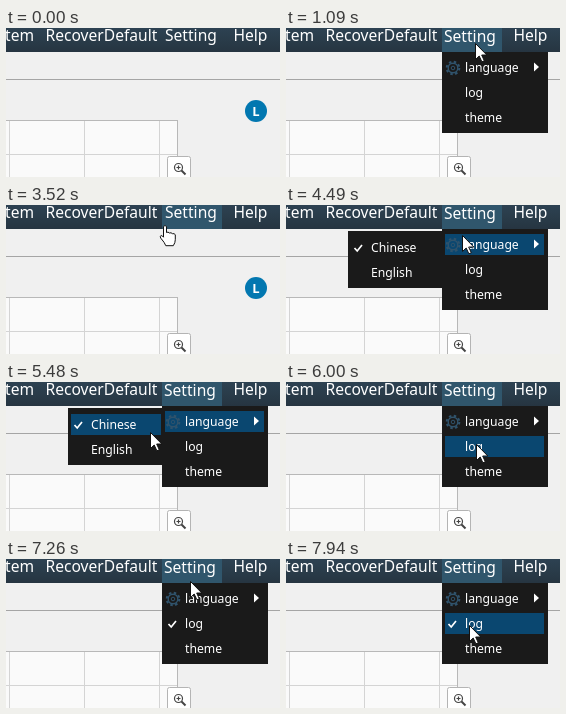
An HTML page for the animation above (8000 ms loop, 274 by 149 pixels).

```html
<!DOCTYPE html>
<html lang="en">
<head>
<meta charset="utf-8">
<title>Settings menu</title>
<style>
html, body { margin: 0; height: 100%; overflow: hidden; background: #f0f0f0; }
svg { display: block; width: 100vw; height: 100vh; }
text { font-family: "Noto Sans", "Open Sans", sans-serif; fill: #fff; }
.bar text { font-size: 15.6px; }
.menu text { font-size: 12.2px; }
.menu > rect:first-child { fill: #1a1a1a; }
.menu > .lit { fill: #0a4770; }
.tick { fill: none; stroke: #fff; stroke-width: 1.7; }
.cursor { fill: #fff; stroke: #111; stroke-width: 1; stroke-linejoin: round; }
</style>
</head>
<body>
<svg viewBox="0 0 274 149">
  <defs>
    <linearGradient id="shade" x2="0" y2="1">
      <stop stop-color="#2d4252"/><stop offset="1" stop-color="#263541"/>
    </linearGradient>
  </defs>
  <rect width="274" height="149" fill="#f0f0f0"/>
  <rect y="51" width="274" height="1" fill="#a5a5a5"/>

  <rect x="-1" y="92.5" width="172.5" height="60" fill="#fafafa" stroke="#b8b8b8"/>
  <path d="M3.5 93v56M78.5 93v56M153.5 93v56M0 126.5h171" stroke="#d4d4d4"/>
  <rect x="161.5" y="128.5" width="23" height="26" rx="2" fill="#fff" stroke="#b4b4b4"/>
  <g fill="none" stroke="#444" stroke-width="1.2">
    <circle cx="172.5" cy="139.5" r="4"/>
    <path d="M170.5 139.5h4M172.5 137.5v4"/>
    <path d="M175.5 142.5l4 4" stroke-width="2"/>
  </g>
  <circle cx="250" cy="83" r="11" fill="#0277b0"/>
  <text x="250" y="88" font-size="13" font-weight="700" text-anchor="middle">L</text>

  <g class="bar">
    <rect width="274" height="24" fill="url(#shade)"/>
    <rect id="button" x="156" width="60" height="24" fill="#30566c"/>
    <text x="-1" y="13">tem</text>
    <text x="39.5" y="13">RecoverDefault</text>
    <text id="setting" x="159" y="13">Setting</text>
    <text x="227.5" y="13">Help</text>
  </g>

  <g class="menu" id="menu">
    <rect x="156" y="24" width="106" height="81"/>
    <rect class="lit" id="litLanguage" x="159" y="29" width="99" height="21"/>
    <rect class="lit" id="litLog" x="159" y="54" width="99" height="21"/>
    <g fill="none" stroke="#30536c">
      <circle cx="167" cy="40" r="6.3" stroke-width="2" stroke-dasharray="2.5 2.45"/>
      <circle cx="167" cy="40" r="4.8" stroke-width="1.4"/>
      <circle cx="167" cy="40" r="1.8"/>
    </g>
    <text x="179" y="44">language</text>
    <text x="179" y="69">log</text>
    <text x="179" y="94">theme</text>
    <path d="M248 34.5v9l5-4.5z" fill="#fff"/>
    <path class="tick" id="tickLog" d="M162.5 65l2.7 3 4.8-6"/>
  </g>

  <g class="menu" id="submenu">
    <rect x="62" y="26" width="94" height="57"/>
    <rect class="lit" id="litChinese" x="65" y="32" width="90" height="21"/>
    <rect class="lit" id="litEnglish" x="65" y="57" width="90" height="21"/>
    <text x="85" y="47">Chinese</text>
    <text x="85" y="72">English</text>
    <path class="tick" id="tickLanguage" d="M68.5 43l2.7 3 4.8-6"/>
  </g>

  <g class="cursor" id="cursor">
    <path id="arrow" d="M.5 .5v16l3.7-3.5 2.7 5.8 2.4-1-2.6-5.8h5.1z"/>
    <path id="hand" d="M-1.5 1.5q1.5-2 3 0v6q1.5-1 3 .5q1.5-.8 3 .7q1.7-.5 2.8 1v5q0 3-2 6h-7.5q-1-3-5-7.5q-1.5-2 .3-2.6q1.2-.2 2.4 1.6z"/>
  </g>
</svg>
<script>
const LOOP = 8000;
// Pointer glides: first jump, last jump, number of jumps, final x, final y
const glides = [
  [60, 410, 6, 186, 8],
  [1030, 1270, 4, 199, 37],
  [1630, 1800, 3, 121, 37],
  [2010, 2010, 1, 115, 37],
  [2240, 2320, 2, 100, 41],
  [3300, 3520, 4, 159, 20],
  [3600, 3820, 4, 161, 8],
  [4130, 4270, 3, 177, 18],
  [4410, 4490, 2, 176, 30],
  [4590, 4590, 1, 176, 31],
  [4800, 4880, 2, 135, 39],
  [5090, 5260, 3, 120, 58],
  [5340, 5590, 4, 168, 42],
  [5670, 5840, 3, 189, 55],
  [5920, 6000, 2, 190, 62],
  [6590, 6810, 4, 184, 15],
  [7260, 7260, 1, 184, 22],
  [7340, 7560, 4, 184, 42],
  [7640, 7940, 5, 183, 66]
];
const menuOpen = [[640, 2990], [3820, 6280], [6950, LOOP]];
const submenuOpen = [[1270, 2990], [4490, 5840], [7490, 7790]];

const el = id => document.getElementById(id);
const show = (id, on) => el(id).setAttribute("visibility", on ? "inherit" : "hidden");
const during = (spans, t) => spans.some(([from, to]) => t >= from && t < to);

function pointer(t) {
  let x = 193, y = 96;
  for (const [from, to, jumps, endX, endY] of glides) {
    if (t < from) break;
    const gap = (to - from) / (jumps - 1 || 1) || 1;
    // Jumps fall on multiples of 10 ms
    const done = Math.min(jumps, 1 + Math.floor((t - from + 5) / gap));
    const part = t >= to ? 1 : Math.min(done, jumps - 1) / jumps;
    x += (endX - x) * part;
    y += (endY - y) * part;
  }
  return [Math.round(x), Math.round(y)];
}

function draw(t) {
  const [x, y] = pointer(t);
  const open = during(menuOpen, t), sub = during(submenuOpen, t);
  const inSub = sub && x < 156;
  const within = (top, bottom) => y >= top && y < bottom;
  const hover = t >= 60 && x >= 156 && x < 216 && within(0, 24);
  const pressed = open || t >= 6810;

  show("menu", open);
  show("submenu", sub);
  show("button", open || hover);
  show("litLanguage", open && (inSub || x >= 156 && within(27, 52)));
  show("litLog", open && !inSub && within(52, 77));
  show("litChinese", inSub && within(30, 55));
  show("litEnglish", inSub && within(55, 80));
  show("tickLog", open && t >= 6280);
  el("tickLanguage").setAttribute("transform", `translate(0 ${t < 2990 ? 25 : 0})`);
  el("setting").setAttribute("x", pressed ? 158 : 159);
  el("setting").setAttribute("y", pressed ? 14 : 13);

  // The hand stays after a click until the pointer moves
  const hand = hover && (!open || y === 8);
  show("cursor", t >= 60);
  show("hand", hand);
  show("arrow", !hand);
  el("cursor").setAttribute("transform", `translate(${x} ${y})`);
}

const start = performance.now();
function tick() {
  draw((performance.now() - start) % LOOP);
  requestAnimationFrame(tick);
}
tick();
</script>
</body>
</html>
```
